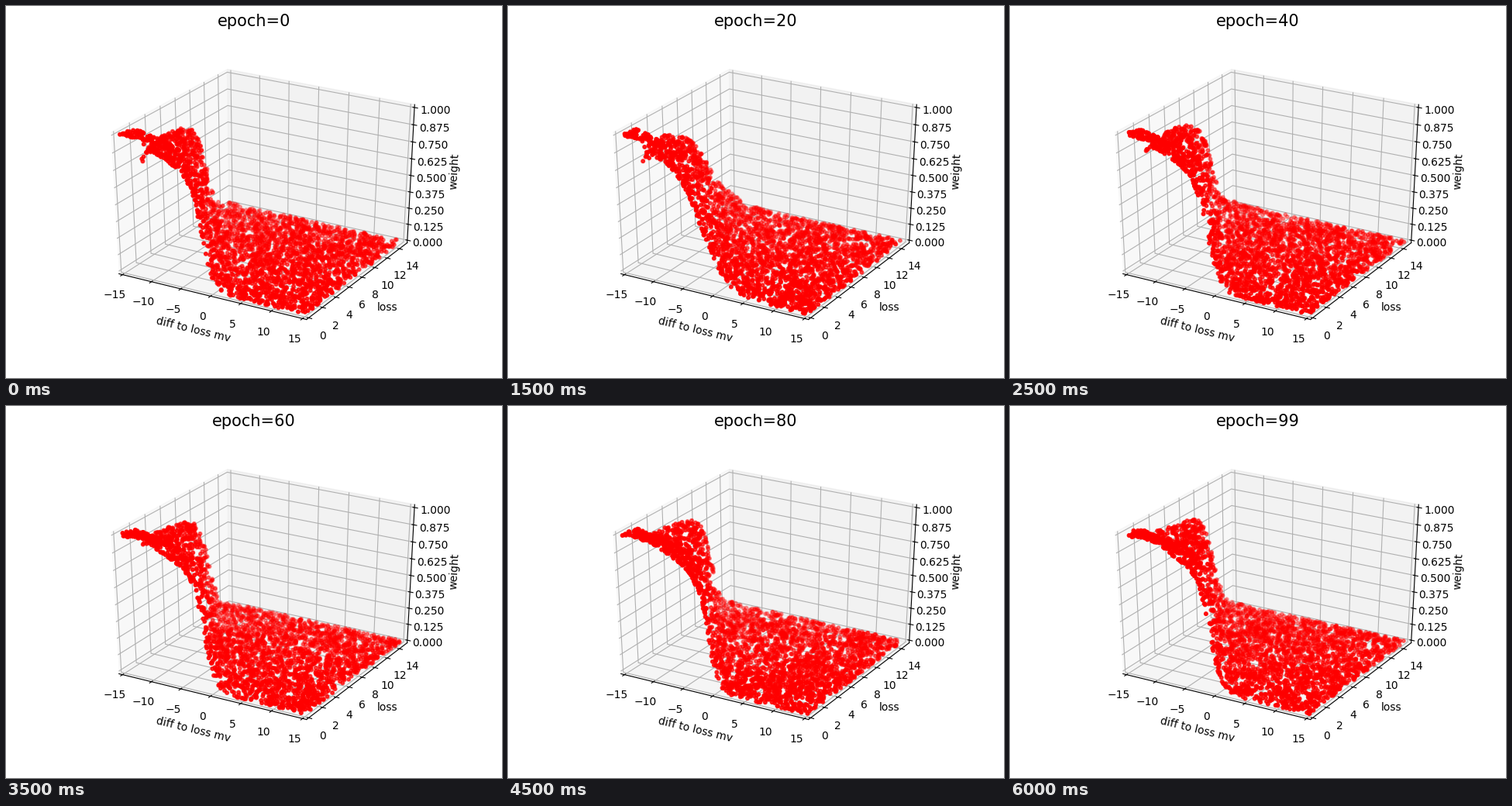
Animation, 640 px wide and 480 px high, one loop 6500 ms. Source, as a matplotlib script:

```python
import numpy as np
import matplotlib.pyplot as plt
from matplotlib.animation import FuncAnimation

W, H, DPI = 640, 480, 100
EPOCHS = [0, 5, *range(10, 91, 10), 95, 99]
N_POINTS = 2800

EDGE = 0.5 + 1 / 48      # half side of the drawn box, in cube units
STEP = 1 / 12            # base length for ticks and label offsets
PER_POINT = 48 / (72 * (4.96 + 3.696))
TICK_PAD = 11.5 * PER_POINT * STEP
LABEL_PAD = 25 * PER_POINT * STEP

# Camera basis: azimuth -60, elevation 30
AZ, EL = np.radians(-60), np.radians(30)
RIGHT = np.array([-np.sin(AZ), np.cos(AZ), 0])
UP = np.array([-np.sin(EL) * np.cos(AZ), -np.sin(EL) * np.sin(AZ), np.cos(EL)])
TOWARD = np.array([np.cos(AZ) * np.cos(EL), np.sin(AZ) * np.cos(EL), np.sin(EL)])


def project(points):
    """Map box-centred cube coordinates to stage pixels (y up) and depth."""
    points = np.asarray(points, float)
    dist = 10 - points @ TOWARD
    px = 80 + (points @ RIGHT / dist + 0.095) / 0.185 * 496
    py = 52.8 + (points @ UP / dist + 0.095) / 0.185 * 369.6
    return np.stack([px, py], axis=-1), -10 / dist


def sigmoid(t):
    return 1 / (1 + np.exp(-np.clip(t, -60, 60)))


def bump(x, centre, width):
    return np.exp(-((x - centre) / width) ** 2)


def weight(diff, loss, epoch):
    """A plateau that falls off along a diagonal, with a raised front shelf."""
    soft = bump(epoch, 22, 12)
    plateau = 0.89 + 0.0006 * epoch - 0.29 * bump(epoch, 95, 2)
    x = diff + 15
    reach = x + 1.15 * loss
    rim = x / 11.8 + loss / 2.5
    groove = 0.26 * (1 - epoch / 100) * np.exp(
        -3 * np.maximum(rim - 1, 0) - x / (1 + 2 * soft))
    base = plateau * (1 - 0.01 * reach) - groove
    shelf = sigmoid((1 - rim) / 0.03)
    height = base + (1 - 0.01 * loss - base) * shelf
    fall = (13.4 + 0.007 * epoch - reach) / (0.8 + 1.05 * soft)
    return height * sigmoid(fall)


def cloud(i):
    """Pixel positions and depth-faded colours of the samples at step i."""
    rng = np.random.default_rng(100 + i)
    diff = rng.uniform(-15, 15, N_POINTS)
    loss = rng.uniform(0, 15, N_POINTS)
    z = weight(diff, loss, EPOCHS[i])
    cube = np.column_stack([diff / 30, loss / 15 - 0.5, z - 0.5])
    pos, depth = project(cube)
    colors = np.zeros((N_POINTS, 4))
    colors[:, 0] = 1
    colors[:, 3] = 1 - 0.7 * (depth - depth.min()) / np.ptp(depth)
    return pos, colors


fig = plt.figure(figsize=(W / DPI, H / DPI), dpi=DPI, facecolor="white")
ax = fig.add_axes([0, 0, 1, 1])
ax.set_xlim(0, W)
ax.set_ylim(0, H)
ax.axis("off")


def line(points, **style):
    pos, _ = project(points)
    ax.plot(pos[:, 0], pos[:, 1], lw=0.8, **style)


def pane(corners, shade):
    pos, _ = project(np.array(corners) * EDGE)
    ax.add_patch(plt.Polygon(pos, closed=False, facecolor=(shade,) * 3,
                             edgecolor=(shade,) * 3, lw=1, alpha=0.5, zorder=0))


def draw_axis(index, side, tick_dir, grid, ticks, labels, title):
    """side: sign of the box edge carrying the axis, 0 along the axis."""
    side = np.array(side, float)
    along = np.eye(3)[index]
    outward = np.eye(3)[tick_dir] * side
    ends = [side * EDGE - along * EDGE, side * EDGE + along * EDGE]
    line(ends, color="black")
    for value, text in zip(ticks, labels):
        line([np.array(g) * EDGE + along * value for g in grid],
             zorder=1, color="#b0b0b0", solid_capstyle="butt")
        at = side * EDGE + along * value
        line([at + 0.2 * STEP * outward, at - 0.1 * STEP * outward],
             color="black")
        (x, y), _ = project(at + side * TICK_PAD)
        ax.text(x, y, text, fontsize=10, ha="center", va="top")
    (start, end), _ = project(ends)
    dx, dy = end - start
    angle = np.degrees(np.arctan2(dy, dx)) if len(title) > 4 else 0
    (x, y), _ = project(side * (EDGE + LABEL_PAD))
    ax.text(x, y, title, fontsize=10, ha="center", va="center",
            rotation=angle, rotation_mode="anchor")


pane([(-1, -1, -1), (-1, 1, -1), (-1, 1, 1), (-1, -1, 1)], 0.95)
pane([(-1, 1, -1), (1, 1, -1), (1, 1, 1), (-1, 1, 1)], 0.90)
pane([(-1, -1, -1), (1, -1, -1), (1, 1, -1), (-1, 1, -1)], 0.925)

diffs = np.arange(-15, 16, 5)
losses = np.arange(0, 15, 2)
weights = np.linspace(0, 1, 9)
draw_axis(0, (0, -1, -1), 1, [(0, -1, -1), (0, 1, -1), (0, 1, 1)],
          diffs / 30, [str(v).replace("-", "\u2212") for v in diffs],
          "diff to loss mv")
draw_axis(1, (1, 0, -1), 0, [(1, 0, -1), (-1, 0, -1), (-1, 0, 1)],
          losses / 15 - 0.5, [str(v) for v in losses], "loss")
draw_axis(2, (1, 1, 0), 0, [(-1, -1, 0), (-1, 1, 0), (1, 1, 0)],
          weights - 0.5, [f"{v:.3f}" for v in weights], "weight")

dots = ax.scatter(np.zeros(N_POINTS), np.zeros(N_POINTS), s=8, c="red",
                  linewidths=1.5, zorder=5)
heading = fig.suptitle("", fontsize=15)


def update(i):
    pos, colors = cloud(i)
    dots.set_offsets(pos)
    dots.set_facecolor(colors)
    dots.set_edgecolor(colors)
    heading.set_text(f"epoch={EPOCHS[i]}")
    return dots, heading


anim = FuncAnimation(fig, update, frames=len(EPOCHS), interval=500,
                     repeat=True, repeat_delay=0, blit=False)
plt.show()
```
